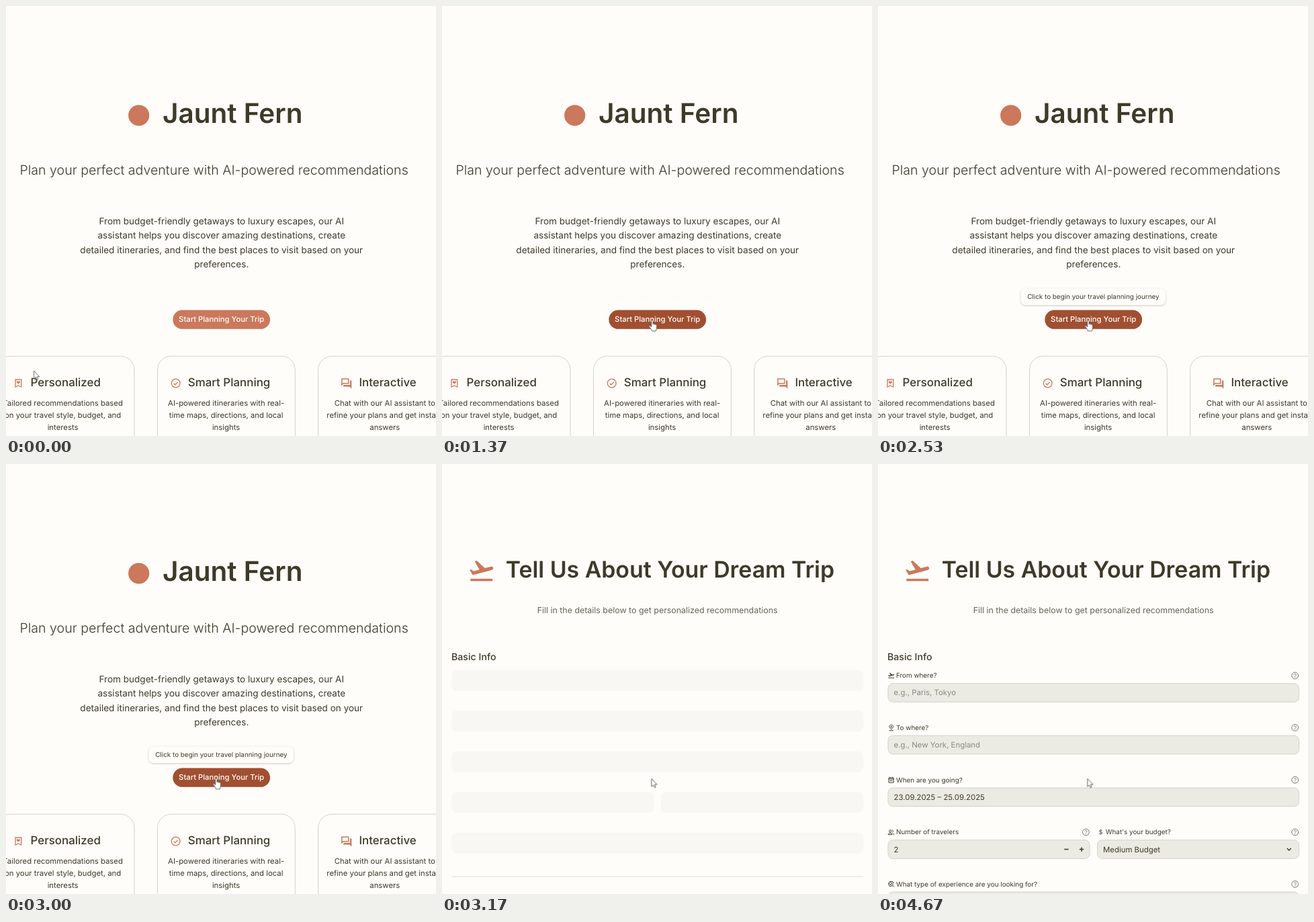
Recreate the animation shown at these times as an HTML page. Size 640 by 640 pixels, loop 5.2 s.

```html
<!DOCTYPE html>
<html lang="en">
<head>
<meta charset="utf-8">
<title>Trip planner</title>
<style>
  html, body { margin: 0; width: 100%; height: 100%; overflow: hidden; background: #fefdf9; }
  svg { display: block; width: 100vw; height: 100vh; }
  text { font-family: Inter, sans-serif; font-optical-sizing: none; text-rendering: geometricPrecision; fill: #3d3a2a; }
  .mid { text-anchor: middle; }
  .title { font-size: 40.5px; font-weight: 600; }
  .lead { font-size: 19.6px; font-weight: 300; }
  .body { font-size: 13.55px; }
  .btn { font-size: 11.25px; font-weight: 500; fill: #fff; }
  .head { font-size: 16.9px; font-weight: 500; }
  .note { font-size: 11.35px; }
  .small { font-size: 9.9px; }
  .form-title { font-size: 33.85px; font-weight: 600; }
  .sub { font-size: 12.42px; fill: #66645a; }
  .section { font-size: 14.2px; font-weight: 500; }
  .value { font-size: 11.4px; }
  .hint { fill: #8b897f; }
  .card { fill: none; stroke: #d3d2ca; }
  .field { fill: #ecebe3; stroke: #d3d2ca; }
  .bone { fill: #f8f7f3; }
  .coral { fill: #cb785c; }
  .line { fill: none; stroke: #cb785c; stroke-width: 1.3; }
  .ink { fill: none; stroke: #3d3a2a; stroke-width: 1; }
  .tip { fill: #fefdf9; filter: drop-shadow(0 1px 1.5px rgba(0, 0, 0, .2)); }
  .pointer { fill: #fff; stroke: #4a4a4a; stroke-width: .85; stroke-linejoin: round; }

  .home, .skeleton, .form, .page, .fill, .arrow, .hand { animation: 5200ms step-end infinite; }
  .home { animation-name: home; }
  .page { animation-name: page; }
  .skeleton { animation-name: skeleton; }
  .form { animation-name: form; }
  .fill { animation-name: fill; }
  .arrow { animation-name: arrow; }
  .hand { animation-name: hand; }
  .tooltip { animation: tooltip 5200ms linear infinite; }
  .mouse { animation: mouse 5200ms linear infinite; }

  @keyframes home { 0% { opacity: 1 } 58.85%, 100% { opacity: 0 } }
  @keyframes page { 0% { opacity: 0 } 58.85%, 100% { opacity: 1 } }
  @keyframes skeleton { 0% { opacity: 1 } 63.46%, 100% { opacity: 0 } }
  @keyframes form { 0% { opacity: 0 } 63.46%, 100% { opacity: 1 } }
  @keyframes fill { 0% { fill: #cb785c } 21.15%, 100% { fill: #a14f31 } }
  @keyframes arrow { 0% { opacity: 1 } 21.15% { opacity: 0 } 58.85%, 100% { opacity: 1 } }
  @keyframes hand { 0% { opacity: 0 } 21.15% { opacity: 1 } 58.85%, 100% { opacity: 0 } }
  @keyframes tooltip { 0%, 26.35% { opacity: 0 } 28.27%, 100% { opacity: 1 } }
  @keyframes mouse {
    0% { transform: translate(41.5px, 543px) }
    12.5% { transform: translate(41.5px, 543px); animation-timing-function: cubic-bezier(.33, 0, .67, .33) }
    16.73% { transform: translate(124.5px, 516px); animation-timing-function: cubic-bezier(.33, .67, .67, 1) }
    23.65%, 100% { transform: translate(311.8px, 468.3px) }
  }
</style>
</head>
<body>
<svg viewBox="0 0 640 640">
  <defs>
    <path id="plane" d="M2.5 19h19v2h-19zm19.57-9.36c-.21-.8-1.04-1.28-1.84-1.06L14.92 10l-6.9-6.43-1.93.51 4.14 7.17-4.97 1.33-1.97-1.54-1.45.39 2.59 4.49 1.6-.43 5.31-1.42 4.35-1.16L21 11.49c.81-.23 1.28-1.05 1.07-1.85z"/>
    <g id="help">
      <circle r="4.9" fill="none" stroke="#77756b"/>
      <path d="M-1.6-1.1C-1.5-3.1 1.6-3.1 1.6-1.1C1.6.1 0 .1 0 1.3M0 2.2V3.2" fill="none" stroke="#77756b"/>
    </g>
  </defs>

  <g class="home">
    <circle class="coral" cx="197.7" cy="162.8" r="15.6"/>
    <text class="title" x="233" y="174">Jaunt Fern</text>
    <text class="lead mid" x="309.6" y="251">Plan your perfect adventure with AI-powered recommendations</text>
    <g class="mid">
      <text class="body" x="320.8" y="324.6">From budget-friendly getaways to luxury escapes, our AI</text>
      <text class="body" x="320.8" y="346.2">assistant helps you discover amazing destinations, create</text>
      <text class="body" x="320.8" y="367.8">detailed itineraries, and find the best places to visit based on your</text>
      <text class="body" x="320.8" y="389.4">preferences.</text>
    </g>

    <rect class="fill" x="248.3" y="452.5" width="144.8" height="28.3" rx="14.15"/>
    <text class="btn mid" x="320.7" y="470.4">Start Planning Your Trip</text>
    <g class="tooltip">
      <rect class="tip" x="212.5" y="420.5" width="215.5" height="24.5" rx="7"/>
      <text class="small mid" x="320.4" y="436.4">Click to begin your travel planning journey</text>
    </g>

    <rect class="card" x="-13.8" y="521.2" width="204.8" height="160" rx="20.25"/>
    <rect class="card" x="225.5" y="521.2" width="204.8" height="160" rx="20.25"/>
    <rect class="card" x="464.7" y="521.2" width="204.8" height="160" rx="20.25"/>

    <path class="line" d="M14 556h8.8v11l-4.4-2-4.4 2z"/>
    <path class="coral" d="M18.4 562.6l-2.5-2.4c-1-1.6 1.3-3 2.5-1.2c1.2-1.8 3.5-.4 2.5 1.2z"/>
    <circle class="line" cx="252.7" cy="561.5" r="6.4"/>
    <path class="line" d="M249.6 561.6l2.2 2.2 4-4.2"/>
    <path class="coral" transform="translate(497.6 552.7) scale(.76)" d="M15 4v7H5.17L4 12.17V4h11m1-2H3c-.55 0-1 .45-1 1v14l4-4h10c.55 0 1-.45 1-1V3c0-.55-.45-1-1-1zm5 4h-2v9H6v2c0 .55.45 1 1 1h11l4 4V7c0-.55-.45-1-1-1z"/>

    <text class="head" x="36.6" y="566">Personalized</text>
    <text class="head" x="270.8" y="566">Smart Planning</text>
    <text class="head" x="525.4" y="566">Interactive</text>
    <g class="mid">
      <text class="note" x="84.6" y="595">Tailored recommendations based</text>
      <text class="note" x="84.6" y="613.2">on your travel style, budget, and</text>
      <text class="note" x="84.6" y="631.4">interests</text>
      <text class="note" x="327.6" y="595">AI-powered itineraries with real-</text>
      <text class="note" x="327.6" y="613.2">time maps, directions, and local</text>
      <text class="note" x="327.6" y="631.4">insights</text>
      <text class="note" x="563.8" y="595">Chat with our AI assistant to</text>
      <text class="note" x="563.8" y="613.2">refine your plans and get instant</text>
      <text class="note" x="563.8" y="631.4">answers</text>
    </g>
  </g>

  <g class="page">
    <use class="coral" href="#plane" transform="translate(38 137.8) scale(1.73)"/>
    <text class="form-title mid" x="339.4" y="168.6">Tell Us About Your Dream Trip</text>
    <text class="sub mid" x="320.6" y="222.4">Fill in the details below to get personalized recommendations</text>
    <text class="section" x="14" y="291.6">Basic Info</text>

    <g class="skeleton">
      <rect class="bone" x="14.5" y="306.8" width="612.5" height="31" rx="7"/>
      <rect class="bone" x="14.5" y="367.2" width="612.5" height="31" rx="7"/>
      <rect class="bone" x="14.5" y="427.8" width="612.5" height="31" rx="7"/>
      <rect class="bone" x="14.5" y="488.2" width="301" height="31" rx="7"/>
      <rect class="bone" x="326" y="488.2" width="301" height="31" rx="7"/>
      <rect class="bone" x="14.5" y="548.8" width="612.5" height="31" rx="7"/>
      <path d="M14.5 614.2H627" stroke="#dddcd5"/>
    </g>

    <g class="form">
      <use href="#plane" fill="#3d3a2a" transform="translate(14.2 309) scale(.46)"/>
      <text class="small" x="27" y="318">From where?</text>
      <use href="#help" x="620.7" y="315"/>
      <rect class="field" x="15" y="326.6" width="611.5" height="27.6" rx="7"/>
      <text class="value hint" x="23.5" y="344.4">e.g., Paris, Tokyo</text>

      <path class="ink" d="M19.7 395c-4.4-4-3.2-6.6 0-6.6s4.4 2.6 0 6.6zM16.6 396.8h6.2"/>
      <circle cx="19.7" cy="391.4" r="1.1" fill="#3d3a2a"/>
      <text class="small" x="27" y="395.8">To where?</text>
      <use href="#help" x="620.7" y="392.4"/>
      <rect class="field" x="15" y="404.2" width="611.5" height="27.6" rx="7"/>
      <text class="value hint" x="23.5" y="422.1">e.g., New York, England</text>

      <path class="ink" d="M16 467.2h7.2v7H16zM16 469h7.2M17.8 465.6v2M21.4 465.6v2M17.6 471.4h4"/>
      <text class="small" x="27" y="473.6">When are you going?</text>
      <use href="#help" x="620.7" y="470.2"/>
      <rect class="field" x="15" y="482" width="611.5" height="27.6" rx="7"/>
      <text class="value" x="23.5" y="499.9">23.09.2025 – 25.09.2025</text>

      <g class="ink">
        <circle cx="18.2" cy="546.4" r="1.6"/>
        <path d="M15.3 551.6v-1.2c1.6-1.5 4.2-1.5 5.8 0v1.2zM20.8 544.6c2.2 0 2.2 3.4 0 3.4M22.4 549.6l1.2 1v1.4"/>
      </g>
      <text class="small" x="27" y="551.4">Number of travelers</text>
      <use href="#help" x="309.4" y="548"/>
      <rect class="field" x="15" y="559.7" width="300" height="27.6" rx="7"/>
      <text class="value" x="23.5" y="577.7">2</text>
      <path class="ink" d="M277.2 573.6h6.4M299.8 573.6h6.4M303 570.4v6.4" style="stroke-width:1.5"/>

      <text class="small" x="328.4" y="551.2" style="font-size:9px">$</text>
      <text class="small" x="338.8" y="551.4">What's your budget?</text>
      <use href="#help" x="620.7" y="548"/>
      <rect class="field" x="326.5" y="559.7" width="300" height="27.6" rx="7"/>
      <text class="value" x="335" y="577.7">Medium Budget</text>
      <path class="ink" d="M608.8 572l3 3 3-3" style="stroke-width:1.5"/>

      <g class="ink">
        <path d="M23.4 624.4a3.9 3.9 0 1 0-4 4.6M16 624l3 2.4M18 622c1 1.6 2 .6 3 2"/>
        <circle cx="20.8" cy="626.4" r="1.6"/>
        <path d="M22 627.6l2 2"/>
      </g>
      <text class="small" x="27" y="628.8">What type of experience are you looking for?</text>
      <use href="#help" x="620.7" y="625.4"/>
      <rect class="field" x="15" y="637" width="611.5" height="27.6" rx="7"/>
    </g>
  </g>

  <g class="mouse">
    <path class="pointer arrow" d="M0 0V12L2.7 9.6 4.4 13.4 6.3 12.5 4.6 8.8H8.3Z"/>
    <path class="pointer hand" transform="translate(-.8 -.8)" d="M.6 10V1.6C.6-.1 3-.1 3 1.6V6.2C3.4 5.2 5 5.4 5.1 6.5C5.6 5.7 7 6 7.1 7C7.7 6.4 8.7 6.8 8.7 7.9V11.2C8.7 13 7.6 14 7.4 16.2H1.4C1.2 14-1 12.2-2.7 9.6C-3.4 8.4-1.9 7.6-1 8.5Z"/>
  </g>
</svg>
</body>
</html>
```
